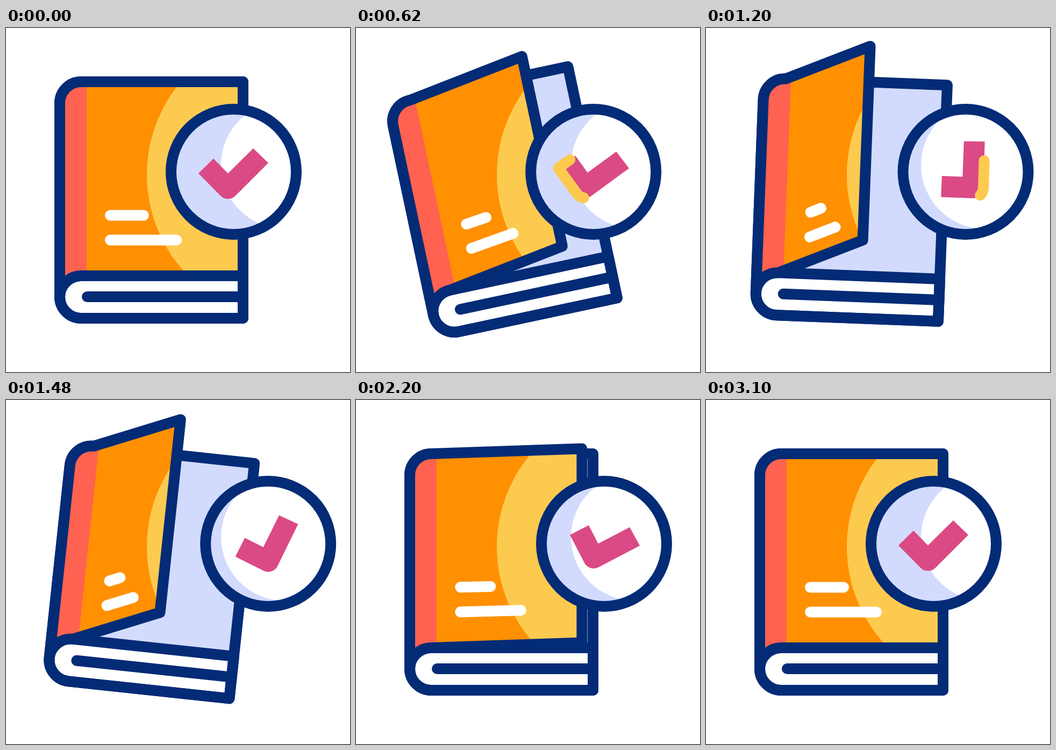
An HTML page with a canvas that plays this animation: 640 px wide and 640 px high, repeating every 3600 ms.

```html
<!DOCTYPE html>
<html lang="en">
<head>
<meta charset="utf-8">
<title>Book check</title>
<style>
html, body { margin: 0; width: 100%; height: 100%; overflow: hidden; background: #fff; }
canvas { display: block; }
</style>
</head>
<body>
<canvas id="stage" width="640" height="640"></canvas>
<script>
const ctx = document.getElementById('stage').getContext('2d');
const LOOP = 3600, RAD = Math.PI / 180;
const NAVY = '#042b76', ORANGE = '#fe9002', RED = '#ff6250', YELLOW = '#fdca50',
      LILAC = '#d2dbfd', PINK = '#da4a84', WHITE = '#fff';
const PIVOT = [284, 308], LENS = [423.5, 267.5], TICK_LENGTH = 358;

// Progress from 0 to 1 between the times a and b
const linear = (t, a, b) => Math.min(1, Math.max(0, (t - a) / (b - a)));

function soft(t, a, b) {
  const x = linear(t, a, b);
  return x * x * (3 - 2 * x);
}

function cubic(t, a, b) {
  const x = linear(t, a, b);
  return x < .5 ? 4 * x ** 3 : 1 - 4 * (1 - x) ** 3;
}

// Up from a to b, back down from b to c
const pulse = (t, a, b, c) => soft(t, a, b) - soft(t, b, c);

const openness = t => cubic(t, 100, 1110) - cubic(t, 1343, 2620);
const tilt = t => 27.2 * soft(t, 430, 1537) - 19 * soft(t, 420, 720) - 8.2 * soft(t, 1300, 1880);
const slide = t => 64.2 * (soft(t, 200, 1400) - soft(t, 1850, 2650));
const turn = t => 11 * pulse(t, 200, 800, 1220) - 43.5 * pulse(t, 800, 1220, 1700)
  + 18 * pulse(t, 1850, 2250, 2700);

function fill(path, color) {
  ctx.fillStyle = color;
  ctx.fill(path);
}

function stroke(path, color) {
  ctx.strokeStyle = color;
  ctx.stroke(path);
}

function disc(x, y, r) {
  const p = new Path2D();
  p.arc(x, y, r, 0, 7);
  return p;
}

function spin([x, y], deg) {
  ctx.translate(x, y);
  ctx.rotate(deg * RAD);
  ctx.translate(-x, -y);
}

const body = new Path2D('M441 100H140A40 40 0 0 0 100 140V500A40 40 0 0 0 140 540H441Z');
const pages = new Path2D('M441 461H140A40 39.5 0 0 0 100 500A40 40 0 0 0 140 540H441Z');
const leaf = new Path2D('M151 500H441');
const tick = new Path2D('M413 318A20 20 0 0 1 399 312L358 270.5L386 243L413 270.5' +
  'L460 224L488 251L427 312A20 20 0 0 1 413 318');
const coverLight = disc(530, 273, 268);
const lensLight = disc(518.5, 255, 118.5);

// A title bar whose right end moves in and up as the cover opens
const bar = (y, end, dx, dy, open) =>
  `M${194 + 2 * open} ${y - 2.3 * open}L${end - dx * open} ${y - dy * open}`;

function drawBook(t) {
  const open = openness(t), angle = tilt(t);
  const right = 441 - 146 * open, rise = 66.7 * open;
  const cover = new Path2D(`M100 500V140A40 40 0 0 1 140 100L${right} ${100 - rise}` +
    `V${461 - rise}L140 461A40 39.5 0 0 0 100 500`);
  const titles = new Path2D(bar(348.5, 256, 41, 10.5, open) + bar(394.5, 317, 74, 22.5, open));

  ctx.save();
  spin(PIVOT, angle);
  fill(body, LILAC);
  fill(pages, WHITE);
  [body, pages, leaf].forEach(p => stroke(p, NAVY));

  ctx.save();
  ctx.clip(cover);
  fill(cover, ORANGE);
  ctx.fillStyle = RED;
  ctx.fillRect(90, 90, 60, 420);
  spin(PIVOT, -angle); // the light stays still while the book swings
  fill(coverLight, YELLOW);
  ctx.restore();

  stroke(titles, WHITE);
  stroke(cover, NAVY);
  ctx.restore();
}

function drawLens(t) {
  const shift = slide(t);
  const lens = disc(LENS[0] + shift, LENS[1], 116.5);
  fill(lens, LILAC);
  ctx.save();
  ctx.clip(lens);
  fill(lensLight, WHITE);
  ctx.restore();
  stroke(lens, NAVY);

  ctx.save();
  ctx.translate(shift, 0);
  spin(LENS, turn(t));
  fill(tick, PINK);
  const head = TICK_LENGTH * soft(t, 345, 1135), tail = TICK_LENGTH * soft(t, 620, 1420);
  if (head > tail) {
    ctx.setLineDash([head - tail, 999]);
    ctx.lineDashOffset = -tail;
    stroke(tick, YELLOW);
  }
  ctx.restore();
}

function frame(t) {
  ctx.fillStyle = WHITE;
  ctx.fillRect(0, 0, 640, 640);
  ctx.lineWidth = 20;
  ctx.lineCap = ctx.lineJoin = 'round';
  drawBook(t);
  drawLens(t);
}

const start = performance.now();
function loop() {
  frame((performance.now() - start) % LOOP);
  requestAnimationFrame(loop);
}
loop();
</script>
</body>
</html>
```
